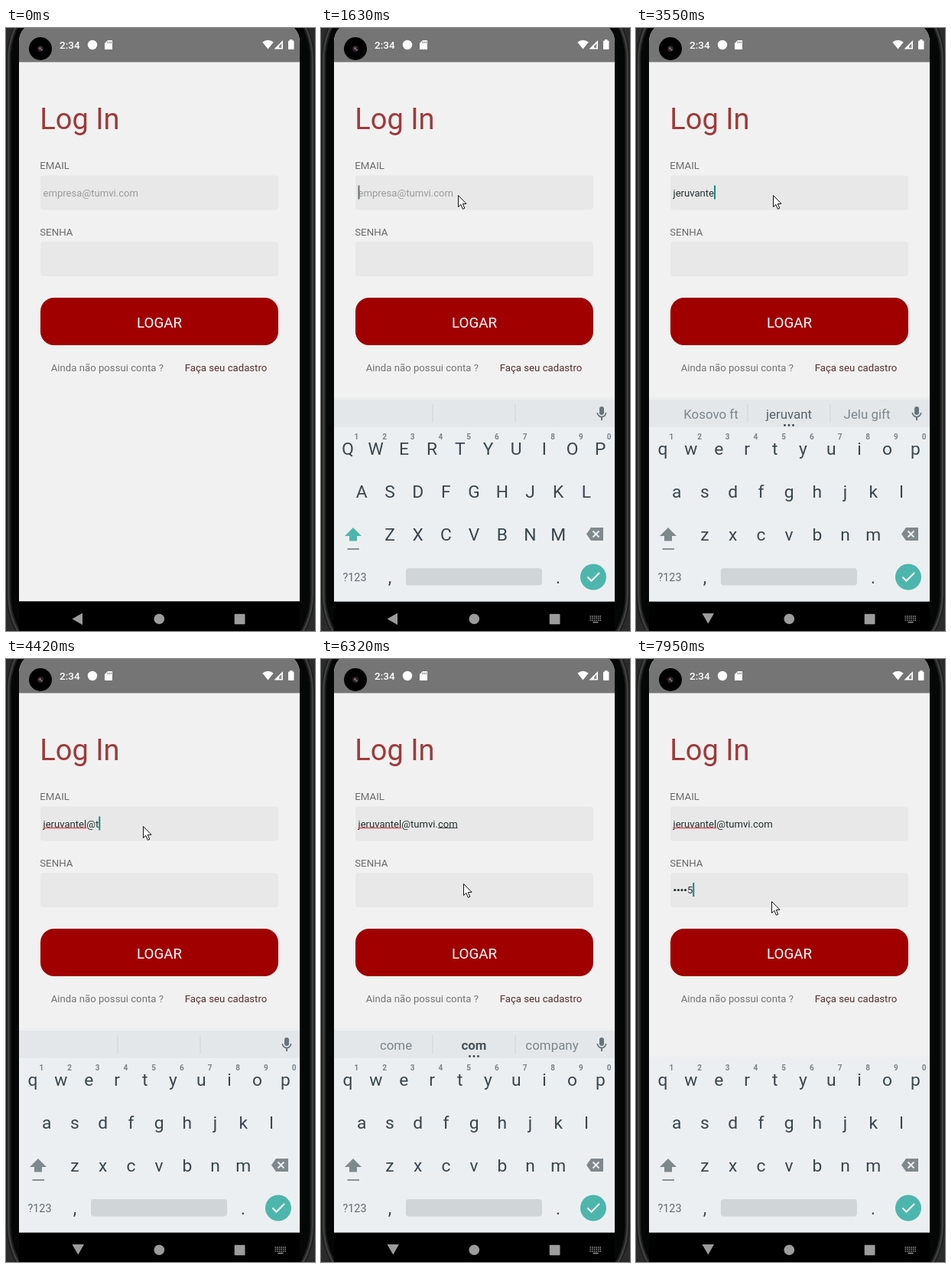
These frames come from a looping animation (404 px wide and 787 px high, 8000 ms). An HTML page with a canvas:

```html
<!DOCTYPE html>
<html lang="pt">
<head>
<meta charset="utf-8">
<title>Log In</title>
<style>
html, body { margin: 0; width: 100%; height: 100%; overflow: hidden; background: #000; }
canvas { display: block; width: 404px; height: 787px; }
</style>
</head>
<body>
<canvas id="stage" width="404" height="787"></canvas>
<script>
const ctx = document.getElementById('stage').getContext('2d');
const LOOP = 8000, STEP = 70;
const TEAL = '#4db6ac', INK = '#37474f', GREY = '#7b878c';

const USER = 'jeruvantel';
const EMAIL = USER + '@tumvi.com';
const HINT = 'empresa@tumvi.com';
const EMAIL_KEYS = [2260, 2460, 2600, 2730, 2940, 3080, 3210, 3410, 3550, 3690,
  4090, 4290, 4430, 4560, 4700, 4830, 4960, 5100, 5230, 5470];
const PASS_KEYS = [6800, 7000, 7270, 7540, 7810];
const FOCUS_EMAIL = 1200, KEYBOARD_IN = 1630, FOCUS_PASS = 6400, STRIP_OUT = 6530;

// time, left, middle, right, bold middle
const SUGGESTIONS = [
  [0, '', '', ''],
  [2330, 'I', 'j', 'just', true],
  [2600, 'he', 'je', 'jet', true],
  [2730, 'her', 'jer', 'jersey'],
  [2870, 'jury', 'jeru', 'hero'],
  [3080, 'serum', 'jeruv', 'jerky'],
  [3210, 'Kosovo', 'jeruva', 'serum'],
  [3340, 'Kosovo', 'jeruvan', 'Jelu gift'],
  [3480, 'Kosovo ft', 'jeruvant', 'Jelu gift'],
  [3690, 'Kosovo ft', 'jeruvante', 'Jelu gift'],
  [3820, 'Kosovo for', 'jeruvantel', 'Jelu gifts'],
  [4160, '', '', ''],
  [4430, 'r', 't', 'the', true],
  [4560, 'to', 'tu', 'turn', true],
  [4700, 'time', 'tum', 'tumble'],
  [4830, 'email', 'tumv', 'e-mail'],
  [4960, 'email', 'tumvi', 'e-mail', true],
  [5240, 'can', 'c', 'could', true],
  [5370, 'come', 'co', 'could', true],
  [5510, 'come', 'com', 'company', true]
];

const font = (size, weight = 400) => `${weight} ${size}px Roboto, sans-serif`;
const typed = (keys, t) => keys.filter(k => k <= t).length;

function text(str, x, y, size, color, weight, align = 'left') {
  ctx.font = font(size, weight);
  ctx.textAlign = align;
  ctx.fillStyle = color;
  ctx.fillText(str, x, y);
}

function width(str, size) {
  ctx.font = font(size);
  return ctx.measureText(str).width;
}

function rect(x, y, w, h, color, r = 0) {
  ctx.fillStyle = color;
  ctx.beginPath();
  ctx.roundRect(x, y, w, h, r);
  ctx.fill();
}

function disc(x, y, r, color) {
  ctx.fillStyle = color;
  ctx.beginPath();
  ctx.arc(x, y, r, 0, Math.PI * 2);
  ctx.fill();
}

function trace(points) {
  ctx.beginPath();
  points.forEach(([x, y]) => ctx.lineTo(x, y));
}

function poly(points, color) {
  trace(points);
  ctx.closePath();
  ctx.fillStyle = color;
  ctx.fill();
}

function line(points, color, w) {
  trace(points);
  ctx.strokeStyle = color;
  ctx.lineWidth = w;
  ctx.stroke();
}

function drawPhone() {
  rect(0, 0, 404, 787, '#2b2b2b');
  // nested shells of the body, from the rim inwards
  [[0.5, '#1c1c1c'], [2, '#3f3f3d'], [4.5, '#1d1e1e'], [6.5, '#050606']].forEach(([inset, color]) =>
    rect(inset, -60 + inset, 404 - inset * 2, 900 - inset * 2, color, 100 - inset));
  rect(17, -8, 367, 756.5, '#f1f1f1', [26, 26, 0, 0]);
  rect(17, -8, 367, 52.5, '#757575', [26, 26, 0, 0]);
  rect(17, 748.5, 367, 39, '#000');
}

function drawStatus() {
  disc(45, 27, 15, '#000');
  disc(45, 27, 4, '#2b2329');
  disc(44.5, 26.5, 1.5, '#806b74');
  disc(46.5, 28.5, 1, '#8f8790');
  text('2:34', 70, 27, 13.5, '#fff', 500);
  disc(113, 22, 6.2, '#fff');
  poly([[133, 16], [139, 16], [139, 28], [129, 28], [129, 20]], '#fff');
  for (const x of [132.5, 134.7, 136.9]) rect(x, 17.5, 1, 2.6, '#757575');
  ctx.fillStyle = '#fff';
  ctx.beginPath();
  ctx.moveTo(342.5, 27.5);
  ctx.lineTo(335.3, 18.6);
  ctx.quadraticCurveTo(342.5, 13, 349.7, 18.6);
  ctx.fill();
  poly([[362, 16], [362, 27.5], [350.5, 27.5]], '#fff');
  poly([[360.3, 20], [360.3, 26], [357, 26], [357, 23.4]], '#8c8c8c');
  rect(369, 16.5, 7.5, 11.5, '#fff', 1);
  rect(371, 15, 3.5, 2, '#fff');
}

function drawForm() {
  text('Log In', 44.3, 132, 38, '#9f3a3a');
  text('EMAIL', 44.2, 184, 13.3, '#6b6b6b');
  text('SENHA', 44.2, 270.5, 13.3, '#6b6b6b');
  rect(45, 192.5, 311, 45, '#e8e8e8', 4);
  rect(45, 279, 311, 45, '#e8e8e8', 4);
  rect(45, 352, 311, 62, '#a00000', 18);
  text('LOGAR', 200.5, 391, 18.8, '#fff', 400, 'center');
  text('Ainda não possui conta ?', 58.7, 447.5, 13.2, '#757575');
  text('Faça seu cadastro', 233.7, 447.5, 13.2, '#5c2e2e');
}

function drawCaret(x, y, t) {
  const starts = [FOCUS_EMAIL, ...EMAIL_KEYS, FOCUS_PASS, ...PASS_KEYS];
  const last = starts.filter(s => s <= t).pop();
  if ((t - last) % 1000 < 500) rect(x, y, 2, 18, t < EMAIL_KEYS[0] ? '#69706e' : '#14897b');
}

function drawEmail(t) {
  const size = 13.1, x = 48.5, value = EMAIL.slice(0, typed(EMAIL_KEYS, t));
  if (value) text(value, x, 219.5, size, '#23302f');
  else text(HINT, x, 219.5, size, '#9b9b9b');
  if (value.includes('@')) rect(x, 219.8, width(USER, size), 1.5, '#df5353');
  if (t >= 5510 && t < FOCUS_PASS) {
    const end = width(EMAIL, size), w = width('com', size);
    rect(x + end - w, 220, w, 1, '#3c4746');
  }
  if (t >= FOCUS_EMAIL && t < FOCUS_PASS) drawCaret(x + width(value, size), 205.5, t);
}

function drawPassword(t) {
  if (t < FOCUS_PASS) return;
  const count = typed(PASS_KEYS, t), gap = 4.6;
  let x = 48.5;
  for (let i = 1; i < count; i++, x += gap) disc(x + gap / 2, 301.5, 1.6, '#23302f');
  if (count) {
    text(String(count), x, 306, 13.1, '#23302f');
    x += width('5', 13.1);
  }
  drawCaret(x, 292, t);
}

function drawMic() {
  rect(364, 494, 6, 11, '#66757b', 3);
  ctx.strokeStyle = '#66757b';
  ctx.lineWidth = 1.7;
  ctx.beginPath();
  ctx.arc(367, 502, 5.6, 0, Math.PI);
  ctx.stroke();
  line([[367, 507], [367, 512]], '#66757b', 2);
}

function drawStrip(t) {
  rect(17, 482, 367, 3, '#eceeef');
  rect(17, 485, 367, 36, '#e3e7e9');
  for (const x of [145.5, 253.5]) rect(x, 491, 1, 24, '#cdd3d6');
  drawMic();
  const [, left, middle, right, bold] = SUGGESTIONS.filter(s => s[0] <= t).pop();
  text(left, 98, 510, 16.9, GREY, 400, 'center');
  text(middle, 200, 510, 16.9, bold ? '#45545b' : '#56646b', bold ? 700 : 400, 'center');
  text(right, 302, 510, 16.9, GREY, 400, 'center');
  if (middle) for (const x of [194.5, 200, 205.5]) disc(x, 518.5, 1.4, INK);
}

function drawKeys(upper) {
  const pitch = 36.7;
  [['qwertyuiop', 35, 557], ['asdfghjkl', 53.3, 613], ['zxcvbnm', 90, 669]].forEach(([row, x, y]) => {
    [...(upper ? row.toUpperCase() : row)].forEach((key, i) =>
      text(key, x + i * pitch, y, 22.8, INK, 400, 'center'));
  });
  for (let i = 0; i < 10; i++)
    text(String((i + 1) % 10), 46.3 + i * pitch, 537, 10, '#78858b', 700, 'center');

  const shift = upper ? TEAL : '#7e898e';
  poly([[42, 652], [53, 663], [47, 663], [47, 669.5], [37, 669.5], [37, 663], [31, 663]], shift);
  rect(34.5, 679, 15.5, 2, '#879197');
  poly([[353, 652], [369, 652], [369, 669], [353, 669], [347, 660.5]], '#7e898e');
  line([[355.5, 656.5], [363.5, 664.5]], '#eceff1', 2);
  line([[363.5, 656.5], [355.5, 664.5]], '#eceff1', 2);

  text('?123', 44, 722, 14.4, '#5f6d74', 400, 'center');
  text(',', 90, 724.5, 23, INK, 400, 'center');
  text('.', 310, 724.5, 23, INK, 400, 'center');
  rect(111, 705, 178, 22.5, '#d0d5d8', 4);
  disc(356, 716.5, 17, TEAL);
  line([[348.5, 716.5], [353.5, 721.5], [364, 711]], '#fff', 2);
}

function drawKeyboard(t) {
  if (t < KEYBOARD_IN) return;
  const strip = t < STRIP_OUT, top = strip ? 484 : 520;
  rect(17, top, 367, 748.5 - top, '#eceff1');
  if (strip) drawStrip(t);
  else rect(17, 518, 367, 2, '#eeefef');
  drawKeys(t < 2330 || (!strip && t < PASS_KEYS[0] + STEP));
}

function drawNav(t) {
  const turn = Math.min(3, Math.max(0, Math.floor((t - KEYBOARD_IN) / STEP))) / 3;
  ctx.save();
  ctx.translate(94, 771 - turn);
  ctx.rotate(-turn * Math.PI / 2);
  poly([[-7.5, 0.3], [6, -7.5], [6, 8]], '#9c9c9c');
  ctx.restore();
  disc(200.3, 771.3, 6.8, '#9c9c9c');
  rect(298.7, 764.7, 13.8, 13.5, '#9c9c9c', 1);
  if (t < KEYBOARD_IN) return;
  for (let r = 0; r < 3; r++)
    for (let c = 0; c < 6; c++) rect(351.5 + c * 2.6, 767 + r * 2.6, 1.6, 1.5, '#8d8d8d');
  rect(355.5, 774.8, 7, 1.6, '#8d8d8d');
}

// start, steps, from, to
const MOVES = [
  [530, 10, [355, 757], [179, 218]],
  [6040, 5, [179, 218], [186, 293]],
  [7880, 2, [186, 293], [177, 316]]
];

function drawPointer(t) {
  const move = MOVES.filter(m => m[0] <= t).pop();
  if (!move) return;
  const [start, steps, from, to] = move;
  const first = start === MOVES[0][0] ? 0 : 1;
  const p = Math.min(1, (Math.floor((t - start) / STEP) + first) / (steps - 1 + first));
  const eased = p * p * (3 - 2 * p);
  ctx.save();
  ctx.translate(...from.map((v, i) => v + (to[i] - v) * eased));
  const arrow = [[0.5, 0.5], [0.5, 15.5], [3.9, 12.4], [6.4, 18.3], [8.8, 17.2], [6.3, 11.6], [11, 11.3]];
  poly(arrow, '#fff');
  line([...arrow, arrow[0]], '#111', 1);
  ctx.restore();
}

function frame(now) {
  const t = now % LOOP;
  drawPhone();
  drawStatus();
  drawForm();
  drawEmail(t);
  drawPassword(t);
  drawKeyboard(t);
  drawNav(t);
  drawPointer(t);
  requestAnimationFrame(frame);
}

frame(0);
</script>
</body>
</html>
```
